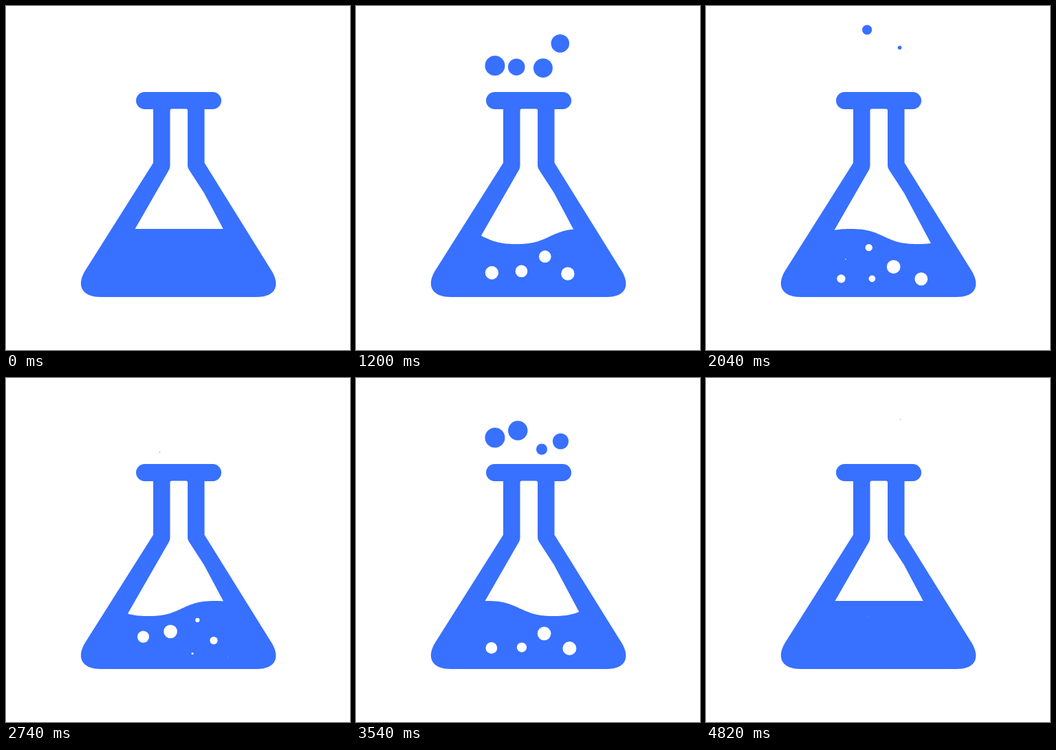
Animation, 500 px wide and 500 px high, one loop 4840 ms. Source, as an HTML page with a canvas:

```html
<!DOCTYPE html>
<html lang="en">
<head>
<meta charset="utf-8">
<title>Bubbling flask</title>
<style>
  html, body { margin: 0; width: 100%; height: 100%; overflow: hidden; background: #fff; }
  canvas { display: block; width: 500px; height: 500px; }
</style>
</head>
<body>
<canvas id="stage" width="500" height="500"></canvas>
<script>
const ctx = document.getElementById('stage').getContext('2d');
const BLUE = '#3870ff', WHITE = '#fff';
const LOOP = 4840, STEP = 20;
const wave = { level: 324, swell: 11, length: 195, start: 600, speed: 0.1435 };

// Each bubble rises from one point to another; birth is its last release in the loop,
// leads tell how much earlier the other releases happen, arc bows the path sideways.
const FIZZ_LEADS = [2500, 1340, 0];
const fizz = [
  { birth: 3060, life: 1520, from: [196, 400], to: [203.5, 368], arc: -1.8 },
  { birth: 3100, life: 1740, from: [242, 400], to: [235, 347], arc: 1 },
  { birth: 2660, life: 1580, from: [271, 401], to: [280, 350.5], arc: -2.5 },
  { birth: 2720, life: 1680, from: [323, 406], to: [297, 379] }
].map(bubble => ({ ...bubble, size: 10, leads: FIZZ_LEADS }));
const vapour = [
  { birth: 2740, life: 1640, from: [220, 106], to: [183, 66], lead: 2340 },
  { birth: 2700, life: 1740, from: [223, 108], to: [231, 29], lead: 2150, arc: 9, lag: 1.15 },
  { birth: 3240, life: 1600, from: [269, 108], to: [283, 60], lead: 2700, arc: -3 },
  { birth: 3100, life: 1500, from: [298, 108], to: [296, 31], lead: 2850 }
].map(bubble => ({ ...bubble, size: 14.5, leads: [bubble.lead, 0] }));

const mix = (a, b, u) => a + (b - a) * u;
const smooth = u => u * u * (3 - 2 * u);
const ramp = (a, b, t) => smooth(Math.min(1, Math.max(0, (t - a) / (b - a))));

function drawBubble({ birth, life, from, to, size, arc = 0, lag = 1 }, t) {
  const age = (t - birth) / life;
  if (age <= 0 || age >= 1) return;
  const u = age ** lag, bulge = Math.sin(Math.PI * u);
  ctx.beginPath();
  ctx.arc(mix(from[0], to[0], u) + arc * bulge, mix(from[1], to[1], smooth(u)), size * bulge, 0, Math.PI * 2);
  ctx.fill();
}

function drawBubbles(bubbles, color, t) {
  ctx.fillStyle = color;
  for (const bubble of bubbles) {
    for (const lead of bubble.leads) drawBubble(bubble, t + lead);
  }
}

const glass = new Path2D(`M214 140V228L118 380C101 404 108 423 138 423H364
  C394 423 400 404 383 380L288.5 228V140Z`);
const cap = new Path2D();
cap.roundRect(189, 125, 124, 25, 12.5);
const hollow = new Path2D(`M238.5 152Q238.5 149.5 241 149.5H261.5Q264 149.5 264 152V232
  Q264 235 266 238L288 272L328.5 348H173.8L237 238Q238.5 235 238.5 232Z`);

function drawAir(t) {
  const trough = wave.start - wave.speed * Math.min(t, 4200);
  const height = wave.swell * ramp(0, 520, t) * (1 - ramp(4320, 4820, t));
  ctx.save();
  ctx.clip(hollow);
  ctx.fillStyle = WHITE;
  ctx.beginPath();
  ctx.moveTo(170, 140);
  for (let x = 170; x <= 332; x += 2) {
    const c = Math.cos((x - trough) * 2 * Math.PI / wave.length);
    const flattened = c * (1.3 - 0.3 * c * c);
    ctx.lineTo(x, wave.level + height * (1 + flattened));
  }
  ctx.lineTo(332, 140);
  ctx.fill();
  ctx.restore();
}

function draw(t) {
  ctx.fillStyle = WHITE;
  ctx.fillRect(0, 0, 500, 500);
  ctx.fillStyle = BLUE;
  ctx.fill(glass);
  ctx.fill(cap);
  drawAir(t);
  drawBubbles(fizz, WHITE, t);
  drawBubbles(vapour, BLUE, t);
}

let start;
function tick(now) {
  start ??= now;
  const t = (now - start) % LOOP;
  draw(Math.floor(t / STEP) * STEP);
  requestAnimationFrame(tick);
}
draw(0);
requestAnimationFrame(tick);
</script>
</body>
</html>
```
